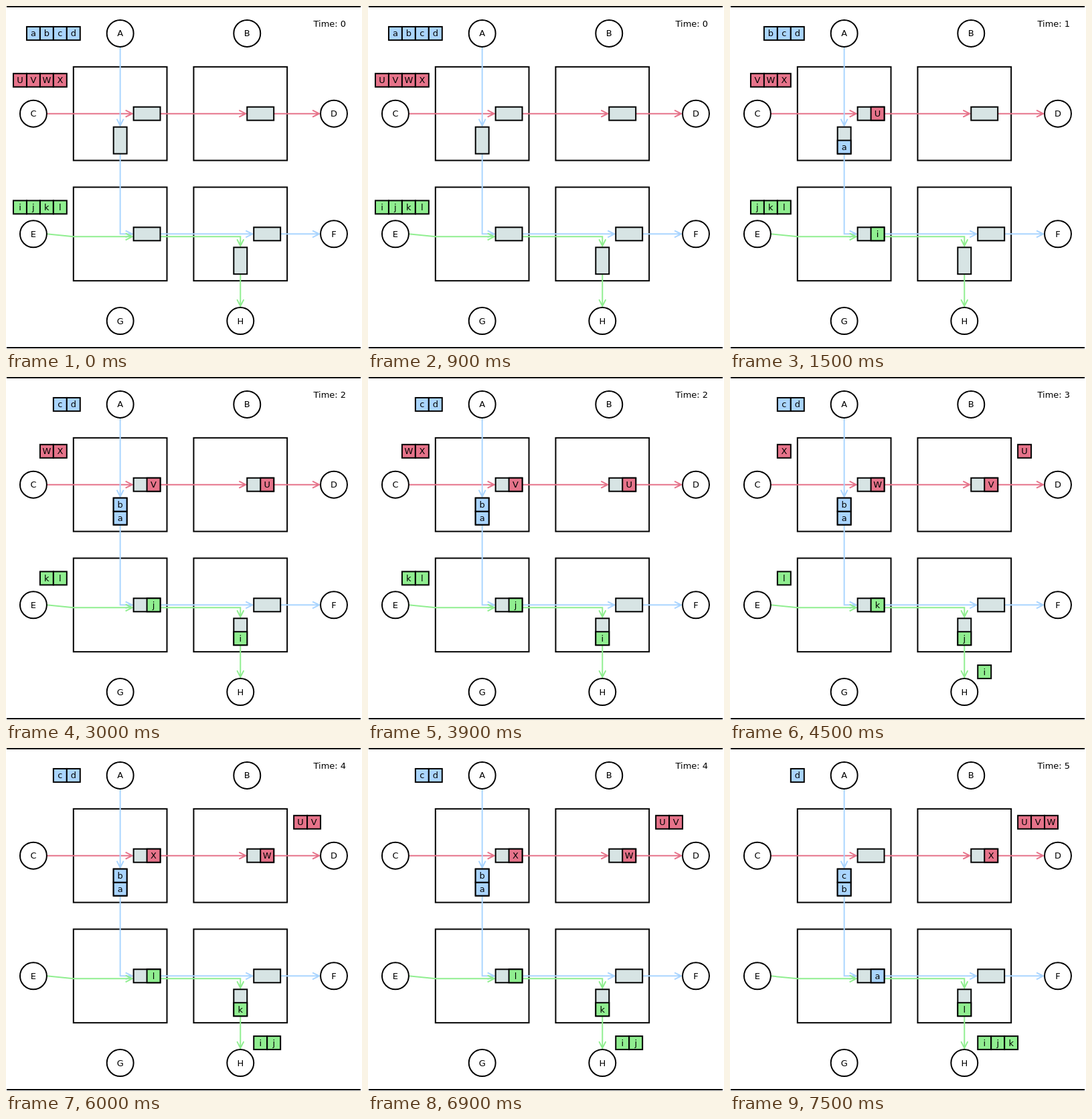
An HTML page that plays this animation: 532 by 512 pixels, repeating every 8 s.

```html
<!DOCTYPE html>
<html lang="en">
<head>
<meta charset="utf-8">
<title>Packet switching</title>
<style>
  html, body { margin: 0; width: 100%; height: 100%; overflow: hidden; background: #fff; }
  svg { display: block; }
  text { font: 13px "DejaVu Sans", sans-serif; fill: #000; stroke: none; }
</style>
</head>
<body>
<svg width="532" height="512" viewBox="0 0 532 512">
  <g id="scene" transform="translate(1 1) scale(.998)" fill="none" stroke="#000" stroke-width="2"></g>
</svg>
<script>
const LOOP = 8000, STEP = 1500;
const BLUE = '#aad5ff', RED = '#e6738a', GREEN = '#90ee90', QUEUE = '#d7e4e4';
const scene = document.getElementById('scene');

function add(tag, attrs, parent = scene) {
  const node = document.createElementNS('http://www.w3.org/2000/svg', tag);
  for (const key in attrs) node.setAttribute(key, attrs[key]);
  return parent.appendChild(node);
}

function label(text, x, y, parent) {
  add('text', { x, y: y + 4.5, 'text-anchor': 'middle' }, parent).textContent = text;
}

const rect = (x, y, width, height, fill = 'none', parent) =>
  add('rect', { x, y, width, height, fill }, parent);

function arrow(color, route, x, y, down) {
  const head = down ? `M${x - 5} ${y - 10}l5 10 5-10` : `M${x - 10} ${y - 5}l10 5-10 5`;
  add('path', { d: `M${route}L${x} ${y}${head}`, stroke: color });
}

// Frame lines and switches
add('path', { d: 'M0 0H530M0 510H530' });
for (const x of [100, 280]) for (const y of [90, 270]) rect(x, y, 140, 140);

// Routes
arrow(RED, '60 160', 188, 160);
arrow(RED, '230 160', 358, 160);
arrow(RED, '400 160', 468, 160);
arrow(BLUE, '170 60', 170, 178, true);
arrow(BLUE, '170 220V340', 188, 340);
arrow(BLUE, '230 340', 368, 340);
arrow(BLUE, '410 340', 468, 340);
arrow(GREEN, '60 340L100 344', 188, 344);
arrow(GREEN, '230 344H350', 350, 358, true);
arrow(GREEN, '350 400', 350, 448, true);

// Queues
for (const [x, y] of [[190, 150], [360, 150], [190, 330], [370, 330]]) rect(x, y, 40, 20, QUEUE);
for (const [x, y] of [[160, 180], [340, 360]]) rect(x, y, 20, 40, QUEUE);

// Hosts
const hosts = { A: [170, 40], B: [360, 40], C: [40, 160], D: [490, 160],
                E: [40, 340], F: [490, 340], G: [170, 470], H: [350, 470] };
for (const [name, [cx, cy]] of Object.entries(hosts)) {
  add('circle', { cx, cy, r: 20, fill: '#fff' });
  label(name, cx, cy);
}

const clock = add('text', { x: 459.5, y: 30 });

// A packet advances one stop at each of its arrival times;
// packets line up side by side at the first stop and at a "row" stop.
const steady = k => [k + 1, k + 2, k + 3];
const flows = [
  { names: 'abcd', color: BLUE, stops: [[30, 30, 'row'], [160, 180], [160, 200], [210, 330]],
    arrivals: k => [[1, 1, 5], [2, 5], [5], []][k] },
  { names: 'UVWX', color: RED, arrivals: steady,
    stops: [[10, 100, 'row'], [210, 150], [380, 150], [430, 100, 'row']] },
  { names: 'ijkl', color: GREEN, arrivals: steady,
    stops: [[10, 290, 'row'], [210, 330], [340, 380], [370, 430, 'row']] },
];

const packets = flows.flatMap(({ names, color, stops, arrivals }) =>
  [...names].map((name, k) => {
    const group = add('g', {});
    rect(0, 0, 20, 20, color, group);
    label(name, 10, 10, group);
    return { group, stops, k, times: arrivals(k) };
  }));

function draw(now) {
  const tick = Math.floor(now % LOOP / STEP);
  clock.textContent = `Time: ${tick}`;
  for (const { group, stops, k, times } of packets) {
    const [x, y, row] = stops[times.filter(t => t <= tick).length];
    group.setAttribute('transform', `translate(${x + (row ? 20 * k : 0)} ${y})`);
  }
}

const start = performance.now();
function loop() {
  draw(performance.now() - start);
  requestAnimationFrame(loop);
}
loop();
</script>
</body>
</html>
```
